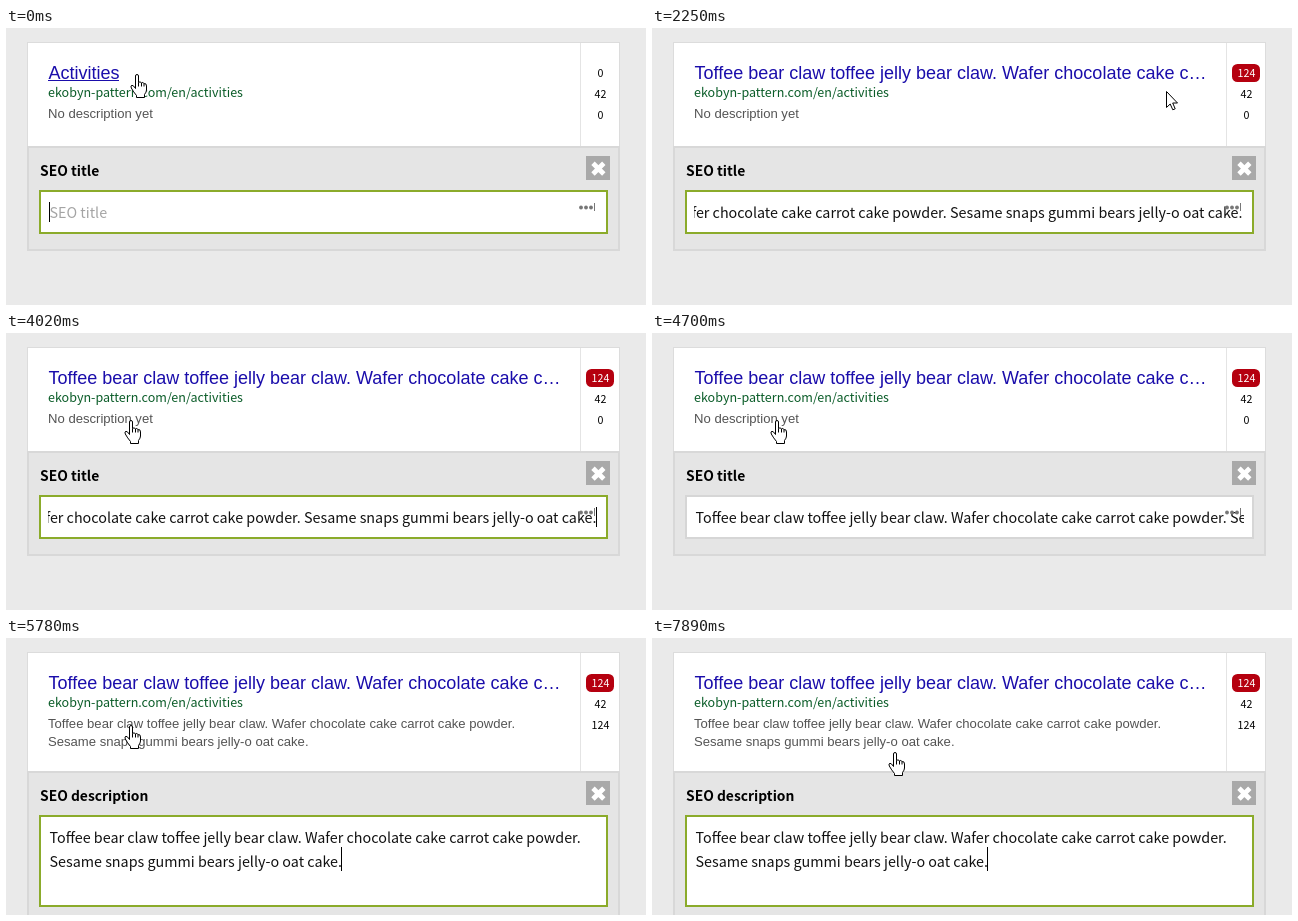
An HTML page for the animation above (8000 ms loop, 640 by 277 pixels).

```html
<!DOCTYPE html>
<html lang="en">
<head>
<meta charset="utf-8">
<title>Search snippet editor</title>
<style>
  html, body { margin: 0; height: 100%; overflow: hidden; background: #eaeaea; }
  svg { display: block; width: 100vw; height: 100vh; }
  text { font: 14.33px "Noto Sans CJK JP", "Noto Sans CJK SC", "Noto Sans CJK", "Open Sans", sans-serif; fill: #111; white-space: pre; }
  .title { font: 18px "Liberation Sans", Arial, sans-serif; fill: #1a0dab; }
  .underline { fill: #1a0dab; }
  .url { font-size: 12.54px; fill: #0a5c28; }
  .snippet { font: 13.1px "Liberation Sans", Arial, sans-serif; fill: #545454; }
  .count { font-size: 10.7px; text-anchor: middle; fill: #000; }
  .over { font-weight: 500; fill: #fff; }
  .label { font-size: 13.85px; font-weight: 700; fill: #000; }
  .hint { fill: #a4a4a4; }
  .panel { fill: #e5e5e5; stroke: #d8d8d8; stroke-width: 2; }
  .field { fill: #fff; stroke: #d6d6d6; stroke-width: 2; }
  .focus { stroke: #8bab2b; }
  .cursor { fill: #fff; stroke: #000; stroke-linejoin: round; }
</style>
</head>
<body>
<svg viewBox="0 0 640 277">
  <defs>
    <clipPath id="inputClip"><rect x="42" y="164" width="550" height="40"/></clipPath>
  </defs>

  <!-- data-on holds the visible spans in ms: start end [start end ...] -->
  <rect x="21.5" y="14.5" width="592" height="150" fill="#fff" stroke="#dcdcdc"/>
  <rect x="574" y="15" width="1" height="140" fill="#e4e4e4"/>

  <text class="title" x="42.5" y="51" data-on="0 690">Activities</text>
  <text class="title" x="42.5" y="51" data-on="690 8000">Toffee bear claw toffee jelly bear claw. Wafer chocolate cake c…</text>
  <rect class="underline" x="42" y="52" width="71" height="1" data-on="0 160"/>
  <rect class="underline" x="42" y="52" width="495" height="1" data-on="3340 3610"/>
  <text class="url" x="42" y="69">ekobyn-pattern.com/en/activities</text>
  <text class="snippet" x="42" y="90" data-on="0 5780">No description yet</text>
  <g data-on="5780 8000">
    <text class="snippet" x="42" y="90">Toffee bear claw toffee jelly bear claw. Wafer chocolate cake carrot cake powder.</text>
    <text class="snippet" x="42" y="108">Sesame snaps gummi bears jelly-o oat cake.</text>
  </g>

  <text class="count" x="594.5" y="49" data-on="0 690">0</text>
  <g data-on="690 8000">
    <rect x="580" y="36" width="28" height="18" rx="5.5" fill="#b5000f"/>
    <text class="count over" x="594.5" y="49">124</text>
  </g>
  <text class="count" x="594.5" y="70">42</text>
  <text class="count" x="594.5" y="91" data-on="0 5780">0</text>
  <text class="count" x="594.5" y="91" data-on="5780 8000">124</text>

  <g id="editor">
    <g data-on="0 4820">
      <rect class="panel" x="22" y="119" width="591" height="103"/>
      <text class="label" x="34" y="148">SEO title</text>
      <rect class="field" x="34" y="163" width="567" height="42"/>
      <rect class="field focus" x="34" y="163" width="567" height="42" data-on="0 4700"/>
      <text class="hint" x="43.5" y="190" data-on="0 690">SEO title</text>
      <g clip-path="url(#inputClip)">
        <text x="590.5" y="190" text-anchor="end" data-on="690 4700">Toffee bear claw toffee jelly bear claw. Wafer chocolate cake carrot cake powder. Sesame snaps gummi bears jelly-o oat cake.</text>
        <text x="43.5" y="190" data-on="4700 4820">Toffee bear claw toffee jelly bear claw. Wafer chocolate cake carrot cake powder. Sesame snaps gummi bears jelly-o oat cake.</text>
      </g>
      <g fill="#777">
        <circle cx="575" cy="179.5" r="1.9"/>
        <circle cx="580" cy="179.5" r="1.9"/>
        <circle cx="585" cy="179.5" r="1.9"/>
        <rect x="588" y="175" width="1" height="8"/>
      </g>
    </g>

    <g data-on="4820 8000">
      <rect class="panel" x="22" y="119" width="591" height="122" data-on="4820 5780"/>
      <rect class="panel" x="22" y="119" width="591" height="170" data-on="5780 8000"/>
      <text class="label" x="34" y="148">SEO description</text>
      <rect class="field focus" x="34" y="163" width="567" height="66" data-on="4820 5780"/>
      <text class="hint" x="43.5" y="190" data-on="4820 5780">SEO description</text>
      <g data-on="5780 8000">
        <rect class="field focus" x="34" y="163" width="567" height="90"/>
        <text x="43.5" y="190">Toffee bear claw toffee jelly bear claw. Wafer chocolate cake carrot cake powder.</text>
        <text x="43.5" y="214">Sesame snaps gummi bears jelly-o oat cake.</text>
      </g>
    </g>

    <rect x="43" y="174" width="1" height="20" data-on="0 300 4820 5250"/>
    <rect x="590" y="174" width="1" height="20" data-on="690 1130 1680 2250 2790 3340 3890 4300"/>
    <rect x="335" y="194" width="1" height="24" data-on="5780 6210 6770 7330 7890 8000"/>

    <rect x="580" y="128" width="24" height="24" fill="#a9a9a9"/>
    <path d="M587 135.2l10.8 10.8m0-10.8l-10.8 10.8" stroke="#fff" stroke-width="4.8"/>
  </g>

  <path id="cursor" class="cursor"/>
</svg>
<script>
  const LOOP = 8000;
  const shapes = {
    hand: 'M5.5 14.5V2Q5.5.5 7 .5T8.5 2V8.5Q10 7 11.5 8.8Q13 7.8 14 9.6Q16.5 9 16.5 12V16Q16.5 18 14.5 20.5V23.5H6.5V21.5' +
          'Q3.5 18 1.3 14Q.3 11.5 2 11.3Q3.5 11.2 5.5 14.5ZM8.5 8.5V12.5M11.5 9V12.5M14 10V12.5',
    arrow: 'M.5.5V16.5L4.2 13L6.8 18.8L9.2 17.8L6.7 12H11.5Z',
    beam: 'M1 .5H7M4 .5V15.5M1 15.5H7',
  };
  // The pointer jumps from stop to stop: time, shape, x, y
  const stops = [
    [0, 'hand', 124, 46], [160, 'hand', 139, 117], [300, 'arrow', 144, 140], [420, 'beam', 148, 155],
    [1960, 'arrow', 220, 136], [2090, 'arrow', 370, 91], [2250, 'arrow', 514, 63], [2370, 'arrow', 553, 57],
    [2520, 'arrow', 573, 56], [2660, 'arrow', 587, 44], [2790, 'beam', 588, 44], [2940, 'beam', 588, 42],
    [3070, 'beam', 588, 41], [3210, 'arrow', 574, 45], [3340, 'hand', 524, 50], [3460, 'arrow', 479, 56],
    [3610, 'arrow', 390, 65], [3760, 'arrow', 250, 76], [3890, 'hand', 146, 84], [4020, 'hand', 118, 87],
    [7480, 'hand', 184, 104], [7610, 'hand', 236, 114],
  ];
  const timed = [...document.querySelectorAll('[data-on]')].map(node => ({
    node, times: node.dataset.on.split(' ').map(Number),
  }));
  const editor = document.getElementById('editor');
  const cursor = document.getElementById('cursor');

  function render(t) {
    for (const { node, times } of timed) {
      const passed = times.filter(time => time <= t).length;
      node.style.display = passed % 2 ? '' : 'none';
    }
    editor.setAttribute('transform', `translate(0 ${t < 5780 ? 0 : 15})`);
    const [, shape, x, y] = stops.findLast(stop => stop[0] <= t);
    cursor.setAttribute('d', shapes[shape]);
    cursor.setAttribute('transform', `translate(${x} ${y})`);
  }

  function tick() {
    render(performance.now() % LOOP);
    requestAnimationFrame(tick);
  }
  tick();
</script>
</body>
</html>
```
